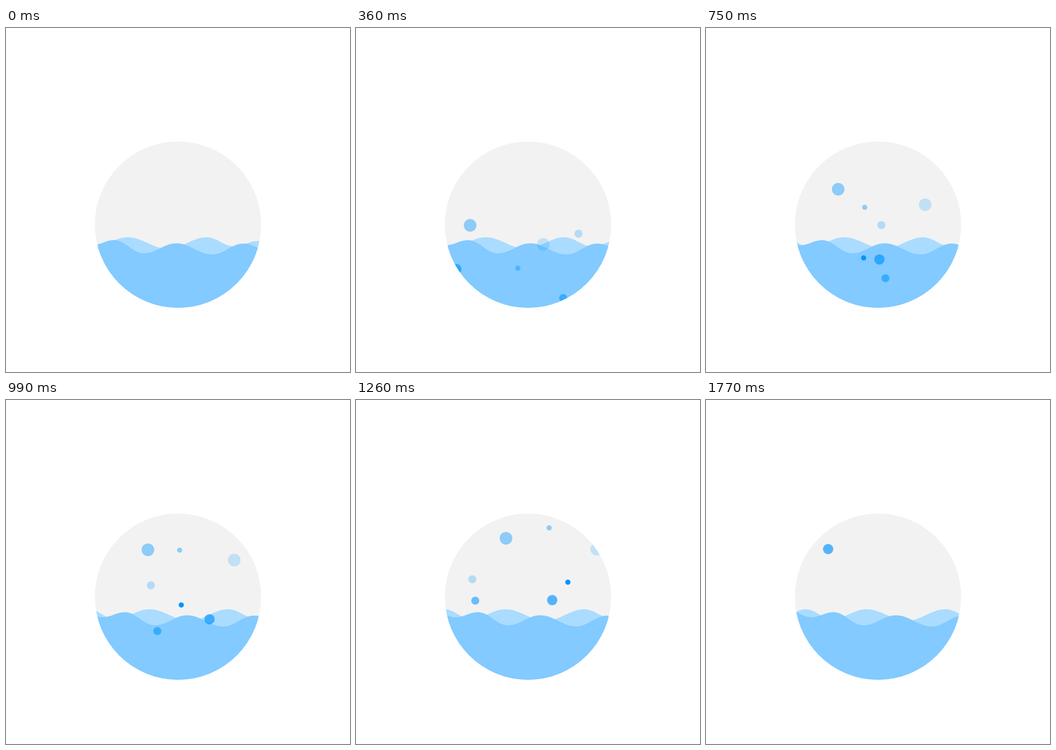
Write an HTML page with a canvas that moves like this. It is 600 px wide and 600 px high and loops after 1.83 s.

```html
<!DOCTYPE html>
<html lang="en">
<head>
<meta charset="utf-8">
<title>Water bubbles</title>
<style>
html, body { margin: 0; width: 100%; height: 100%; overflow: hidden; background: #fff; }
canvas { display: block; width: 600px; height: 600px; }
</style>
</head>
<body>
<canvas width="600" height="600"></canvas>
<script>
const ctx = document.querySelector('canvas').getContext('2d');
const LOOP = 1830, STEP = 30, LAST = 1770;

// Crests and troughs at time 0; drift is the distance covered in one loop.
const waves = [
  { color: '#aadcff', drift: 68, turns: [[65, 378], [106, 365], [152, 382], [212, 365],
    [282, 385], [350, 365], [398, 381], [439, 371.5], [470, 377]] },
  { color: '#82caff', drift: 34, turns: [[108, 366], [150, 379], [188, 370],
    [241, 393], [297, 375.5], [360, 395], [414, 376], [470, 394]] }
];

// Each bubble follows one Bezier curve during its life.
const bubbles = [
  { r: 11, alpha: .42, from: 0, to: LAST, path: [[172, 469], [211, 193], [285, 315], [264, 160]] },
  { r: 11, alpha: .2, from: 0, to: LAST, path: [[195, 464], [501, 306], [297, 225], [544, 267]] },
  { r: 7, alpha: .26, from: 90, to: 1650, path: [[425, 327], [379, 438], [165, 221], [174, 362]] },
  { r: 7, alpha: .56, from: 0, to: LAST, path: [[336, 491], [454, 462], [146, 428], [154, 191]] },
  { r: 4.5, alpha: .42, from: 0, to: 1620, path: [[387, 531], [132, 359], [373, 191], [355, 210]] },
  { r: 9, alpha: .65, from: 150, to: LAST, path: [[179, 420], [57, 428], [664, 400], [255, 344], [213, 260]] },
  { r: 4.5, alpha: 1, from: 360, to: LAST, path: [[363, 511], [109, 337], [490, 340], [417, 226]] }
];

// Repeated interpolation between neighbours leaves the point at u on the curve.
function pointAt(path, u) {
  while (path.length > 1) {
    path = path.slice(1).map(([x, y], i) =>
      [path[i][0] + (x - path[i][0]) * u, path[i][1] + (y - path[i][1]) * u]);
  }
  return path[0];
}

function disc(x, y, r, color) {
  ctx.fillStyle = color;
  ctx.beginPath();
  ctx.arc(x, y, r, 0, 2 * Math.PI);
  ctx.fill();
}

function drawWave({ color, drift, turns }, t) {
  const dx = drift * t / LAST;
  let [x, y] = turns[0];
  ctx.fillStyle = color;
  ctx.beginPath();
  ctx.moveTo(x + dx, 500);
  ctx.lineTo(x + dx, y);
  for (const [nx, ny] of turns.slice(1)) {
    const h = (nx - x) * .38;
    ctx.bezierCurveTo(x + h + dx, y, nx - h + dx, ny, nx + dx, ny);
    [x, y] = [nx, ny];
  }
  ctx.lineTo(x + dx, 500);
  ctx.fill();
}

function drawBubble({ r, alpha, from, to, path }, t) {
  if (t < from || t > to) return;
  ctx.globalAlpha = alpha;
  disc(...pointAt(path, (t - from) / (to - from)), r, '#0094ff');
}

function draw(t) {
  ctx.clearRect(0, 0, 600, 600);
  ctx.save();
  disc(300, 343, 145, '#f2f2f2');
  ctx.clip();
  waves.forEach(w => drawWave(w, t));
  bubbles.forEach(b => drawBubble(b, t));
  ctx.restore();
}

const start = performance.now();
function tick() {
  const t = (performance.now() - start) % LOOP;
  draw(Math.min(Math.floor(t / STEP) * STEP, LAST));
  requestAnimationFrame(tick);
}
tick();
</script>
</body>
</html>
```
